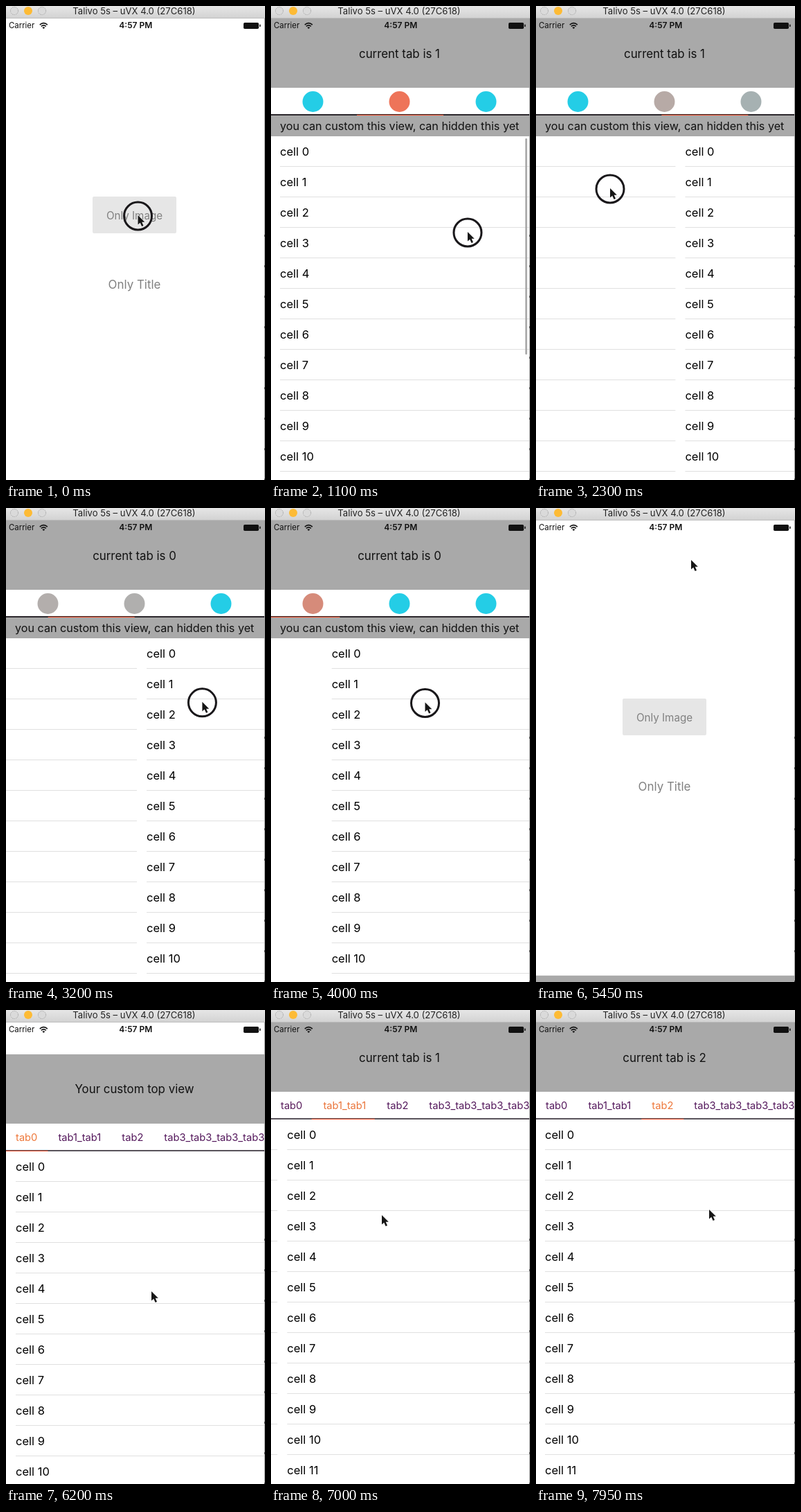
Write an HTML page that moves like this. It is 374 px wide and 684 px high and loops after 8 s.

```html
<!DOCTYPE html>
<html lang="en">
<head>
<meta charset="utf-8">
<title>Tab pages</title>
<style>
html, body { margin: 0; width: 100%; height: 100%; overflow: hidden; background: #fff; }
svg { display: block; width: 374px; height: 684px; font-family: Inter, Roboto, sans-serif; }
</style>
</head>
<body>
<svg id="stage" viewBox="0 0 374 684"></svg>
<script>
const LOOP = 8000, W = 374, TOP = 18, H = 667, ROW = 44, ROWS = 12, LIST = 497;
const ORANGE = [238, 116, 89], GRAY = [178, 175, 173], CYAN = [36, 205, 230];
const PURPLE = [84, 24, 92], AMBER = [238, 120, 58];
const stage = document.getElementById('stage');

function add(parent, tag, attrs, text) {
  const el = document.createElementNS('http://www.w3.org/2000/svg', tag);
  set(el, attrs || {});
  if (text !== undefined) el.textContent = text;
  parent.appendChild(el);
  return el;
}
function set(el, attrs) {
  for (const k in attrs) el.setAttribute(k, attrs[k]);
}
const group = parent => add(parent, 'g');
const rect = (parent, x, y, width, height, fill, rx = 0) =>
  add(parent, 'rect', { x, y, width, height, fill, rx });
const label = (parent, x, y, size, text, more) =>
  add(parent, 'text', { x, y, 'font-size': size, fill: '#111', ...more }, text);
const move = (el, x, y) => set(el, { transform: `translate(${x.toFixed(2)} ${y.toFixed(2)})` });

const lerp = (a, b, u) => a + (b - a) * u;
const clamp = u => Math.max(0, Math.min(1, u));
const span = (t, a, b) => clamp((t - a) / (b - a));
const mix = (a, b, u) => a.map((v, i) => lerp(v, b[i], u));
const rgb = c => `rgb(${c.map(Math.round)})`;
const smooth = u => u * u * (3 - 2 * u);
const settle = u => 1 - (1 - u) ** 3;
const rubber = u => 1 - 1 / (u * .55 + 1);
const pulse = (t, a, b) => span(t, a, a + 80) * (1 - span(t, b, b + 200));
// Critically damped slide used when a sheet opens or closes.
function slide(t, start) {
  const s = Math.max(0, t - start) * .017;
  return 1 - (1 + s) * Math.exp(-s);
}

// Gestures: the pointer, the pages and the list all follow from these.
const drag = (at, end, from, to, page) => ({ at, end, from, to, page });
const tap = (at, ...pos) => drag(at, at + 60, pos, pos);
const dotDrags = [
  drag(600, 820, [290, 326], [160, 318], 1),
  drag(1105, 2300, [284, 326], [107, 263], 1),
  drag(2800, 3250, [90, 275], [290, 280], 0),
  drag(3600, 4000, [50, 285], [222.5, 280.5], 0)
];
const pull = drag(4450, 4770, [222, 170], [224, 343]);
const textDrags = [
  drag(6600, 6820, [305, 300], [160, 296], 1),
  drag(7380, 7620, [350, 284], [250, 288], 2)
];
const gestures = [tap(0, 190.5, 302), ...dotDrags, pull, tap(5010, 224, 75), tap(5830, 210, 406), ...textDrags];

const at = (g, t) => mix(g.from, g.to, smooth(span(t, g.at, g.end)));

function pointerAt(t) {
  const i = gestures.findLastIndex(g => t >= g.at), g = gestures[i], next = gestures[i + 1];
  const pos = at(g, t);
  if (!next) return pos;
  return mix(pos, next.from, smooth(span(t, Math.max(g.end, next.at - 300), next.at)));
}
function pageAt(drags, t) {
  let p = 0;
  for (const g of drags) {
    if (t < g.at) break;
    p -= (at(g, t)[0] - g.from[0]) * .98 / W;
    if (p < 0) p = -rubber(-p);
    p = lerp(p, g.page, settle(span(t, g.end, g.end + 280)));
  }
  return p;
}
function pullAt(t) {
  const dist = at(pull, t)[1] - pull.from[1];
  return LIST * rubber(dist / LIST) * (1 - settle(span(t, pull.end, pull.end + 440)));
}

rect(stage, 0, 0, W, 684, '#fff');
rect(stage, 125, 275, 121, 53, '#e6e6e6', 2);
const mid = { 'text-anchor': 'middle', fill: '#808080' };
label(stage, 185.5, 307.5, 15.2, 'Only Image', mid);
label(stage, 185.5, 408, 16.9, 'Only Title', mid);

function makeSheet(withDots) {
  const root = group(stage), listTop = withDots ? 170 : 140;
  rect(root, 0, 0, W, H, '#fff');
  const pages = [0, 1, 2, 3].map(() => {
    const page = group(root);
    for (let i = 0; i < ROWS; i++) {
      label(page, 14, i * ROW + 28, 16.5, 'cell ' + i, { fill: '#000' });
      rect(page, 14, i * ROW + 43, 360, 1, '#e0e0e0');
    }
    return page;
  });
  const bar = rect(root, 367.3, listTop + 3, 2.4, 312, '#a0a0a0', 1.2);
  rect(root, 0, 0, W, 100, '#a9a9a9');
  const title = label(root, 185.5, 56.5, 16.85, '', { 'text-anchor': 'middle' });
  rect(root, 0, 100, W, 40, '#fff');
  rect(root, 0, 138, W, 2, withDots ? '#2b272c' : '#58525a');
  const mark = rect(root, 0, 139, 0, 1, '#f4532f');

  const edges = [-1];
  const names = withDots ? ['', '', ''] : ['tab0', 'tab1_tab1', 'tab2', 'tab3_tab3_tab3_tab3'];
  const tabs = names.map((name, i) => {
    const x = edges[i];
    const tab = withDots
      ? add(root, 'circle', { cx: x + 61.5, cy: 120, r: 15 })
      : label(root, x + 15, 125, 14.7, name);
    edges.push(x + (withDots ? 125 : tab.getComputedTextLength() + 30));
    return tab;
  });
  if (withDots) {
    rect(root, 0, 140, W, 30, '#a9a9a9');
    label(root, 13, 161, 16.15, 'you can custom this view, can hidden this yet');
  }

  return function update(y, p, moved, down, barAlpha) {
    const shown = y < H - .5;
    set(root, { display: shown ? 'inline' : 'none' });
    if (!shown) return;
    move(root, 0, TOP + y);
    pages.forEach((page, i) => {
      set(page, { display: Math.abs(i - p) < 1 ? 'inline' : 'none' });
      move(page, (i - p) * W - clamp(p), listTop + down);
    });
    title.textContent = moved ? 'current tab is ' + Math.max(0, Math.round(p)) : 'Your custom top view';
    set(bar, { height: 312 - down, opacity: barAlpha });

    const i = Math.max(0, Math.min(tabs.length - 2, Math.floor(p))), u = p - i;
    const left = lerp(edges[i], edges[i + 1], u);
    set(mark, { x: left, width: lerp(edges[i + 1], edges[i + 2], u) - left });
    tabs.forEach((tab, k) => {
      const d = clamp(Math.abs(k - p));
      const dot = d < .5 ? mix(ORANGE, GRAY, d * 2) : mix(GRAY, CYAN, d * 2 - 1);
      set(tab, { fill: rgb(withDots ? dot : mix(AMBER, PURPLE, d)) });
    });
  };
}
const dotSheet = makeSheet(true), textSheet = makeSheet(false);

// Status bar
label(stage, 4, 32.3, 11.4, 'Carrier');
label(stage, 187.3, 32.4, 12, '4:57 PM', { 'text-anchor': 'middle', 'font-weight': 600 });
add(stage, 'path', {
  d: 'M48.8 27.2Q54.3 22.2 59.8 27.2M50.8 29.4Q54.3 26.3 57.8 29.4',
  fill: 'none', stroke: '#111', 'stroke-width': 1.7
});
add(stage, 'path', { d: 'M52.3 31Q54.3 29.3 56.3 31L54.3 33Z', fill: '#111' });
rect(stage, 343, 24, 22, 9, '#111', 1.8);
rect(stage, 366, 26.5, 1.5, 3.6, '#111', .7);

// Window frame
const fade = add(add(stage, 'defs'), 'linearGradient', { id: 'chrome', x1: 0, y1: 0, x2: 0, y2: 1 });
add(fade, 'stop', { offset: 0, 'stop-color': '#e6e6e6' });
add(fade, 'stop', { offset: 1, 'stop-color': '#d3d3d3' });
rect(stage, 0, 0, W, 17, 'url(#chrome)');
rect(stage, 0, 17, W, 1, '#bdbdbd');
for (const cx of [12, 52])
  add(stage, 'circle', { cx, cy: 7, r: 5.6, fill: '#dadada', stroke: '#a9a9a9', 'stroke-dasharray': '1.5 1' });
add(stage, 'circle', { cx: 32, cy: 7, r: 6, fill: '#fdbb35' });
label(stage, 185, 11.8, 13.1, 'Talivo 5s – uVX 4.0 (27C618)', { 'text-anchor': 'middle', fill: '#222' });
rect(stage, 373, 18, 1, 666, '#9a9a9a');
for (let y = 330; y < 684; y += ROW) rect(stage, 373, y, 1, 3, '#333');

// Pointer
const hand = group(stage);
const ring = add(hand, 'circle', { cx: 0, cy: 1, r: 20, fill: 'none', stroke: '#19171a', 'stroke-width': 3 });
add(hand, 'path', {
  d: 'M0 0V13.6L3.2 10.7L5.6 16L8 15L5.7 9.8H9.8Z',
  fill: '#161616', stroke: '#fff', 'stroke-width': 1, 'paint-order': 'stroke'
});

function draw(t) {
  const barAlpha = pulse(t, 1000, 1200) + pulse(t, 4450, 5300);
  dotSheet(H * (1 - slide(t, 50) + slide(t, 5090)), pageAt(dotDrags, t),
    t > dotDrags[0].end, pullAt(t), barAlpha);
  textSheet(H * (1 - slide(t, 5945)), pageAt(textDrags, t), t > textDrags[0].end, 0, 0);
  move(hand, ...pointerAt(t));
  const pressed = gestures.some(g => t >= g.at - 30 && t < g.end + 60);
  set(ring, { visibility: pressed ? 'visible' : 'hidden' });
}
function tick() {
  draw(performance.now() % LOOP);
  requestAnimationFrame(tick);
}
tick();
</script>
</body>
</html>
```
